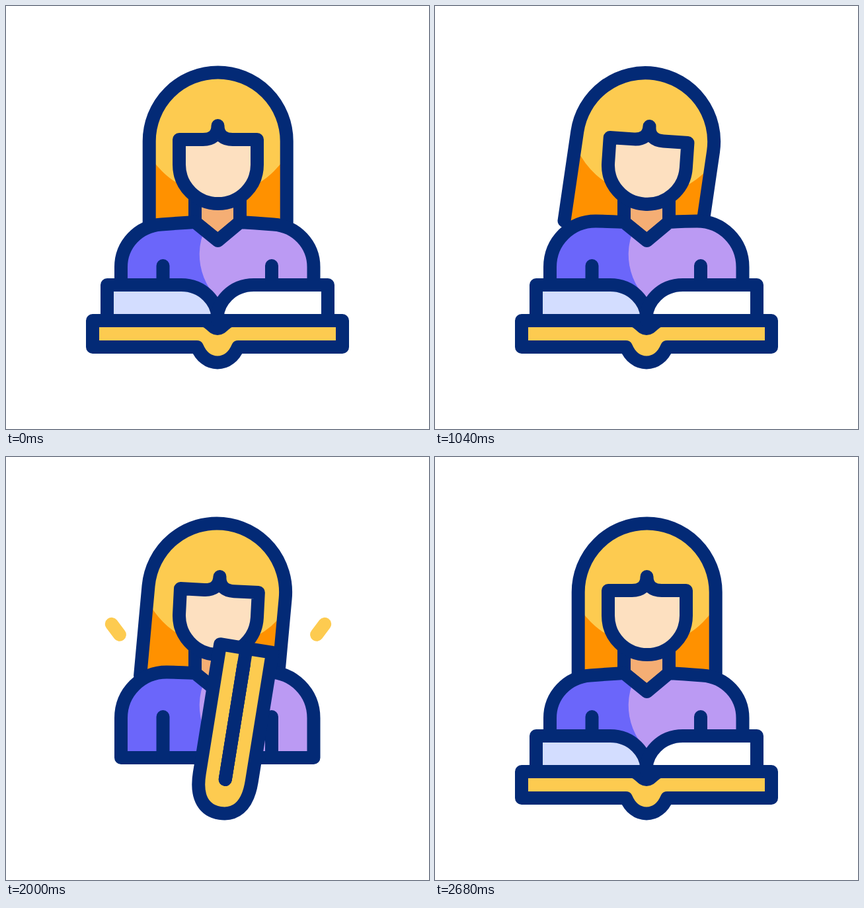
Write an HTML page that moves like this. It is 640 by 640 pixels and loops after 2.82 s.

```html
<!DOCTYPE html>
<html lang="en">
<head>
<meta charset="utf-8">
<title>Reading</title>
<style>
  html, body { margin: 0; height: 100%; overflow: hidden; background: #fff; }
  svg { display: block; width: 100%; height: 100%; }
  .line { fill: none; stroke: #032a76; stroke-width: 20; stroke-linecap: round; stroke-linejoin: round; }
</style>
</head>
<body>
<svg viewBox="0 0 640 640">
  <defs>
    <path id="hairShape" d="M216.7 341V204.5A104 104 0 0 1 424.7 204.5V341"/>
    <path id="bodyShape"/>
    <clipPath id="hairClip"><use href="#hairShape"/></clipPath>
    <clipPath id="bodyClip"><use href="#bodyShape"/></clipPath>
  </defs>
  <g id="hair">
    <use href="#hairShape" fill="#ff9100"/>
    <circle cx="320.7" cy="165" r="120" fill="#fdcb50" clip-path="url(#hairClip)"/>
    <use href="#hairShape" class="line"/>
  </g>
  <path d="M286 285V327L320.5 355L354 327V285" class="line" style="fill:#f5ae74"/>
  <use href="#bodyShape" fill="#6b66fa"/>
  <path d="M311 320A95 95 0 0 0 335 455H470V320Z" fill="#bb9af3" clip-path="url(#bodyClip)"/>
  <use href="#bodyShape" class="line"/>
  <path d="M237.5 393V455M402 393V455" class="line"/>
  <path id="face" class="line" style="fill:#fde0c0"
    d="M262 202H298C311 202 320.5 196 320.5 181C320.5 196 330 202 343 202H380V240A59 59 0 0 1 262 240Z"/>
  <g id="book">
    <path id="cover" class="line" style="fill:#fdcb50"/>
    <path id="leftPage" class="line" style="fill:#d3ddff"/>
    <path id="rightPage" class="line" style="fill:#fff"/>
  </g>
  <path id="sparks" class="line" style="stroke:#fdcb50"/>
</svg>
<script>
const LOOP = 2820, NOD = 960;
const $ = id => document.getElementById(id);
const clamp = v => Math.max(0, Math.min(1, v));
const mix = (a, b, p) => a + (b - a) * p;
const rad = deg => deg * Math.PI / 180;

const hairKeys = [[0, 0], [140, 5], [615, -9.7], [1100, 9], [1575, -9.7], [2020, 5.3], [2560, 0]];
const faceKeys = [[0, 0], [120, 3], [595, -4.5], [1075, 4], [1555, -4.5], [2010, 2.9], [2520, 0]];
const tiltKeys = [[0, 0], [1300, 0], [1700, .8], [1980, 9.2], [2420, .6], [2640, 0]];

// Cosine easing between [time, value] keys.
function ease(keys, t) {
  const i = keys.findIndex(k => k[0] > t);
  if (i < 0) return keys[keys.length - 1][1];
  const [t0, v0] = keys[i - 1], [t1, v1] = keys[i];
  return mix(v0, v1, (1 - Math.cos(Math.PI * (t - t0) / (t1 - t0))) / 2);
}

function foldAngle(t) {
  const p = t < 1960 ? clamp((t - 1300) / 528) : clamp((2660 - t) / 560);
  return 90 * p * p;
}

// raise 0 is a flat shoulder line, raise 1 a round one.
function bodyPath(raise) {
  const y = [[328, 326], [329, 325.5], [330.5, 325.5], [333, 325.5], [361, 356]].map(([a, b]) => mix(a, b, raise));
  const x = [mix(235, 243, raise), mix(200, 205, raise)];
  const m = v => 639.5 - v;
  return `M286 327C268 ${y[0]} 254 ${y[1]} ${x[0]} ${y[2]}C${x[1]} ${y[3]} 174 ${y[4]} 174 395V455H465.5V395` +
    `C465.5 ${y[4]} ${m(x[1])} ${y[3]} ${m(x[0])} ${y[2]}C385.5 ${y[1]} 371.5 ${y[0]} 354 327L320.5 355Z`;
}

function drawBook(deg) {
  const c = Math.max(0, Math.cos(rad(deg))), s = Math.sin(rad(deg));
  const half = 2 * s * c; // peaks when the book is half folded
  const hinge = 476 + 12 * s + 4.5 * half;
  // Point at a distance along one side (-1 or 1) and a height above its inner line.
  const at = (side, along, up = 0) =>
    `${320 + side * (along * c - up * s)} ${hinge - along * s - up * c} `;
  const reach = 189 + 12 * s, joint = 31 - 28 * s, under = -40 - 2 * half;
  const bulge = 25 + 15 * s ** 4, base = 14 + 8 * s;

  $('cover').setAttribute('d',
    `M${at(-1, reach)}L${at(-1, 22)}C${at(-1, 12)}${320 - 8 * c} 488 320 488` +
    `C${320 + 8 * c} 488 ${at(1, 12)}${at(1, 22)}L${at(1, reach)}L${at(1, reach, under)}L${at(1, joint, under)}` +
    `C${320 + bulge} ${530 - 5 * s} ${320 + base} 539.5 320 539.5` +
    `C${320 - base} 539.5 ${320 - bulge} ${530 - 5 * s} ${at(-1, joint, under)}L${at(-1, reach, under)}Z`);

  const edge = 167 + 11 * s, high = 54 * c ** 1.3, inner = high + 15 * half;
  const page = side => `M${at(side, 0)}L${at(side, edge)}L${at(side, edge, high)}L${at(side, 55 + 22 * s, inner)}` +
    `C${at(side, 20, inner)}${at(side, 0, 26 * c)}${at(side, 0, 6 * c)}Z`;
  $('leftPage').setAttribute('d', page(-1));
  $('rightPage').setAttribute('d', page(1));
}

function drawSparks(t) {
  const head = clamp((t - 1840) / 240), tail = clamp((t - 1920) / 240);
  const point = (side, p) => `${321 + side * mix(137, 173, p)} ${mix(285, 237, p)}`;
  $('sparks').setAttribute('d', head > tail
    ? [-1, 1].map(side => `M${point(side, tail)}L${point(side, head)}`).join('') : '');
  $('sparks').style.strokeWidth = 20 * Math.min(1, (head - tail) * 4);
}

function draw(now) {
  const t = now % LOOP;
  const drop = t < 2 * NOD ? 6 * (1 - Math.cos(2 * Math.PI * t / NOD)) : 0;
  const swing = ease(hairKeys, t), tilt = ease(tiltKeys, t);
  $('hair').setAttribute('transform', `translate(0 ${drop}) rotate(${swing} 320.7 187)`);
  $('face').setAttribute('transform', `translate(0 ${drop}) rotate(${ease(faceKeys, t)} 320.5 240)`);
  $('bodyShape').setAttribute('d', bodyPath(clamp((Math.abs(swing) - 1) / 4)));
  $('book').setAttribute('transform', `translate(${.14 * tilt * tilt} 0) rotate(${tilt} 320 488)`);
  drawBook(foldAngle(t));
  drawSparks(t);
}

const start = performance.now();
function tick() {
  draw(performance.now() - start);
  requestAnimationFrame(tick);
}
tick();
</script>
</body>
</html>
```
